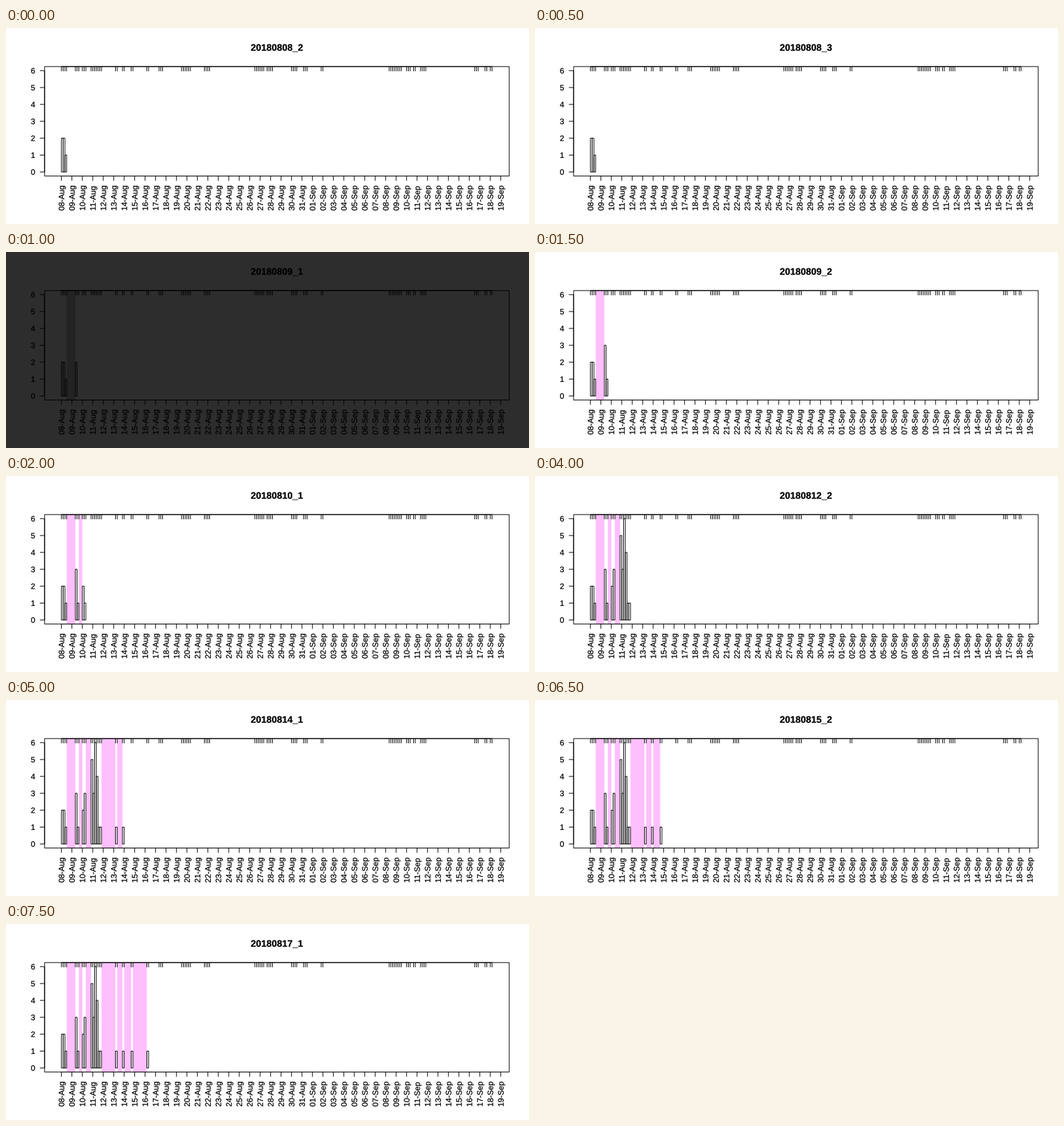
These frames come from a looping animation (800x300 px, 8 s). A matplotlib script:

```python
import matplotlib.pyplot as plt
from matplotlib.animation import FuncAnimation
from matplotlib.patches import Rectangle
from matplotlib.patheffects import Stroke

plt.rcParams["font.family"] = "Liberation Sans"
plt.rcParams["text.hinting"] = "none"
plt.rcParams["path.snap"] = False

W, H, DPI = 800, 300, 100
PX = 72 / DPI                      # points per pixel
LW = PX
LINE = 14.4                        # one margin line in pixels
LEFT, RIGHT = 4.1 * LINE, W - 2.1 * LINE
TOP, BOTTOM = 4.1 * LINE, H - 5.1 * LINE
TICK = LINE / 2

BINS = 247                         # four-hour bins over the whole span
DAY = 16
BIN = DAY / 6
X0 = RIGHT - (RIGHT - LEFT) * 0.04 / 1.08 - BINS * BIN
UNIT = (BOTTOM - TOP) / 1.08 / 6
Y0 = BOTTOM - (BOTTOM - TOP) * 0.04 / 1.08

FONT, TITLE_FONT = 12, 14.4
DIGIT = 0.556                      # digit advance in em
DATE = 3.224                       # advance of a date such as 08-Aug in em

# First and last bin edge of each recording session
RUNS = [(0, 3), (8, 10), (12, 14), (17, 23), (31, 32), (35, 36), (40, 41),
        (49, 50), (56, 58), (69, 74), (82, 85), (111, 116), (118, 121),
        (132, 135), (139, 141), (149, 150), (188, 195), (198, 200),
        (202, 203), (206, 209), (237, 239), (243, 244), (246, 247)]

# Title and the session counts that change at each step
STEPS = [
    ("20180808_2", {0: [2, 2, 1]}),
    ("20180808_3", {}),
    ("20180809_1", {1: [2]}),
    ("20180809_2", {1: [3, 1]}),
    ("20180810_1", {2: [2, 1]}),
    ("20180810_2", {2: [2, 3]}),
    ("20180811_1", {3: [5, 2, 4, 2]}),
    ("20180812_1", {3: [5, 3, 6, 4, 1, 1]}),
    ("20180812_2", {}),
    ("20180813_1", {4: [1]}),
    ("20180814_1", {5: [1]}),
    ("20180814_2", {6: [1]}),
    ("20180815_1", {}),
    ("20180815_2", {}),
    ("20180816_1", {}),
    ("20180817_1", {7: [1]}),
]
DARK_STEP = 2


def bin_x(i):
    return X0 + i * BIN


def count_y(n):
    return Y0 - n * UNIT


fig = plt.figure(figsize=(W / DPI, H / DPI), dpi=DPI)
ax = fig.add_axes([0, 0, 1, 1])
ax.set_xlim(0, W)
ax.set_ylim(H, 0)
ax.axis("off")


def line(xs, ys):
    ax.plot(xs, ys, color="black", lw=LW, solid_capstyle="butt", zorder=3)


def rect(x, y, w, h, **style):
    return ax.add_patch(Rectangle((x, y), w, h, **style))


def label(x, y, text, size=FONT, **style):
    # A hairline stroke draws the glyphs as smooth, slightly heavier outlines
    return ax.text(x, y, text, ha="left", va="baseline",
                   rotation_mode="anchor", fontsize=size * PX,
                   path_effects=[Stroke(linewidth=0.25 * PX)], **style)


rect(LEFT, TOP, RIGHT - LEFT, BOTTOM - TOP, fill=False, ec="black", lw=LW,
     zorder=3)

# Count axis
line([LEFT, LEFT], [count_y(0), count_y(6)])
for n in range(7):
    y = count_y(n)
    line([LEFT - TICK, LEFT], [y, y])
    label(LEFT - LINE - DIGIT * FONT, y + 4.3, str(n))

# Date axis
line([bin_x(0), bin_x(252)], [BOTTOM, BOTTOM])
for k in range(43):
    x, day = bin_x(6 * k), 8 + k
    name = f"{day:02d}-Aug" if day <= 31 else f"{day - 31:02d}-Sep"
    line([x, x], [BOTTOM, BOTTOM + TICK])
    label(x + 4.3, BOTTOM + LINE + DATE * FONT, name, rotation=90)

# Session edges along the top
line([bin_x(0), bin_x(BINS)], [TOP, TOP])
for a, b in RUNS:
    for i in range(a, b + 1):
        line([bin_x(i)] * 2, [TOP, TOP + TICK])

title = label((LEFT + RIGHT) / 2 - 5 * DIGIT * TITLE_FONT, 34.8, "",
              TITLE_FONT, weight="bold")

bars, bands = {}, {}
for r, (a, b) in enumerate(RUNS[:8]):
    for i in range(a, b):
        bars[r, i - a] = rect(bin_x(i), Y0, BIN, 0, fill=False, ec="black",
                              lw=LW, zorder=2)
    if r:
        start = bin_x(RUNS[r - 1][1])
        bands[r] = rect(start, TOP, bin_x(a) - start, BOTTOM - TOP, lw=0,
                        zorder=1)


def draw(step):
    counts = {}
    for _, change in STEPS[:step + 1]:
        counts.update(change)
    dark = step == DARK_STEP
    fig.set_facecolor("#2d2d2d" if dark else "white")
    title.set_text(STEPS[step][0])
    for (r, i), bar in bars.items():
        seen = counts.get(r, [])
        n = seen[i] if i < len(seen) else 0
        bar.set_height(-n * UNIT)
        bar.set_visible(n > 0)
    for r, band in bands.items():
        band.set_facecolor("#232323" if dark else "#ffbfff")
        band.set_visible(r in counts)
    return []


anim = FuncAnimation(fig, draw, frames=len(STEPS), interval=500, repeat=True,
                     repeat_delay=0, blit=False)
plt.show()
```
